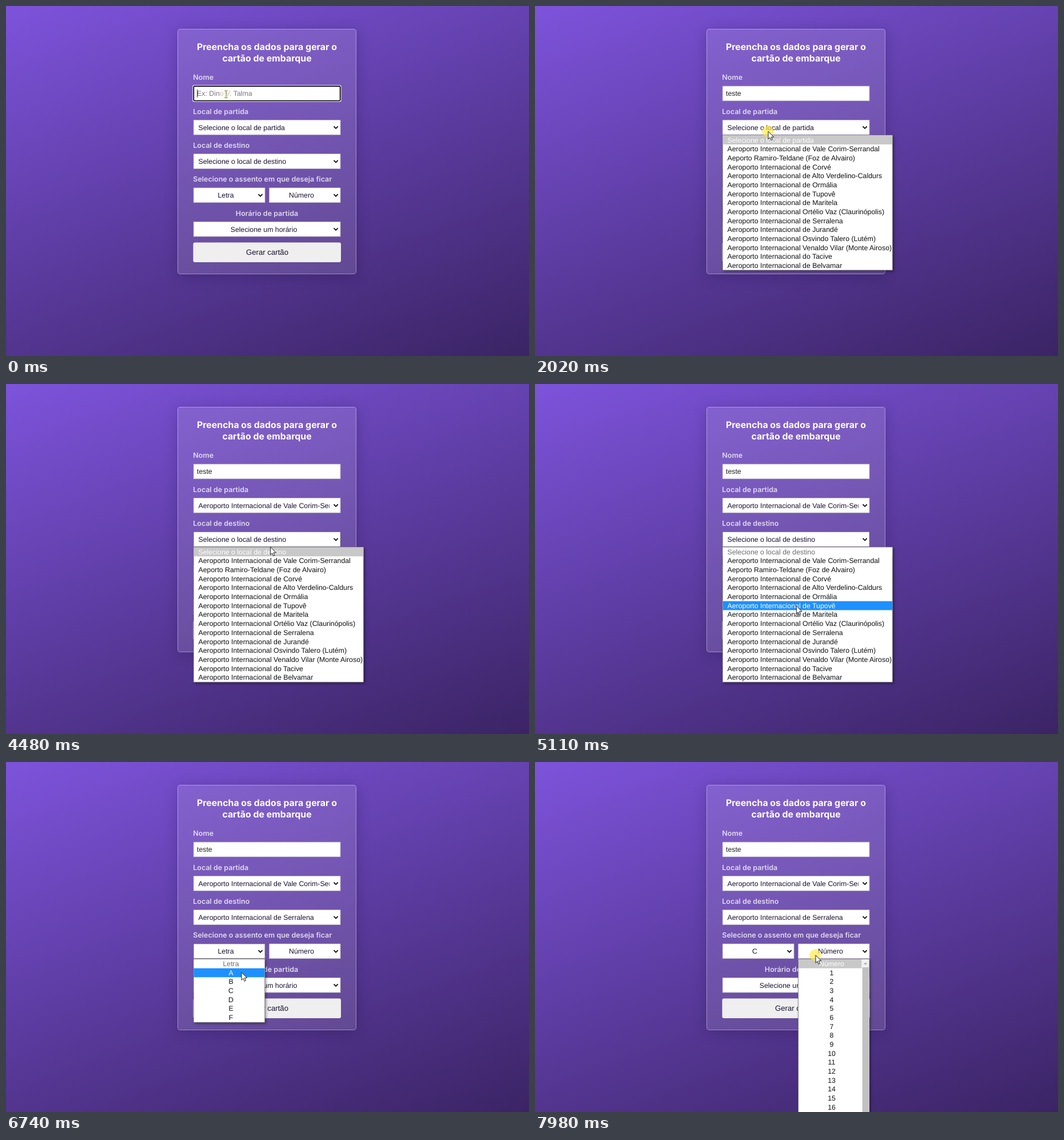
Write an HTML page that moves like this. It is 915x612 px and loops after 8 s.

```html
<!DOCTYPE html>
<html lang="pt-BR">
<head>
<meta charset="utf-8">
<title>Cartão de embarque</title>
<style>
html, body { margin: 0; width: 100%; height: 100%; overflow: hidden; }
body { position: relative; background: linear-gradient(160deg, #7d53db, #3b2465); }
.card {
  position: absolute; left: 300px; top: 40px; width: 313px; height: 429px;
  box-sizing: border-box; border: 1px solid rgba(255,255,255,.36); border-radius: 5px;
  background: rgba(255,255,255,.12); box-shadow: 0 4px 24px rgba(20,10,50,.22);
}
svg { position: absolute; left: 0; top: 0; width: 915px; height: 612px; overflow: hidden; }
text { font: 12.34px "Liberation Sans", Arial, sans-serif; text-rendering: geometricPrecision; white-space: pre; }
.title { font: 700 15.9px Inter, sans-serif; fill: #fff; }
.label { font: 600 12.5px Inter, sans-serif; fill: #e0d9ee; }
.button { font-size: 13.2px; }
.mid { text-anchor: middle; }
.menu { filter: drop-shadow(2px 2px 2px rgba(0,0,0,.4)); }
</style>
</head>
<body>
<div class="card"></div>
<svg viewBox="0 0 915 612">
  <defs><clipPath id="clip"><rect x="328" y="190" width="238" height="100"/></clipPath></defs>
  <g id="labels"></g>
  <g id="scene"></g>
</svg>
<script>
const LOOP = 8000, ROW = 15.67, PITCH = 59.3, INK = '#1a1230';
const $ = id => document.getElementById(id);
const ruler = document.createElement('canvas').getContext('2d');
ruler.font = '12.34px "Liberation Sans", Arial, sans-serif';

const inter = 'Aeroporto Internacional ';
const airports = [inter + 'de Vale Corim-Serrandal', 'Aeporto Ramiro-Teldane (Foz de Alvairo)',
  ...['de Corvé', 'de Alto Verdelino-Caldurs', 'de Ormália', 'de Tupovê', 'de Maritela',
    'Ortélio Vaz (Claurinópolis)', 'de Serralena', 'de Jurandé', 'Osvindo Talero (Lutém)',
    'Venaldo Vilar (Monte Airoso)', 'do Tacive', 'de Belvamar'].map(s => inter + s)];
const numbers = Array.from({ length: 20 }, (_, i) => i + 1);

const field = (line, more) => ({ x: 328, y: 139.9 + line * PITCH, w: 257, ...more });
const name = field(0);
const from = field(1, { hint: 'Selecione o local de partida', list: airports, pick: 1, open: 2020, close: 3590 });
const to = field(2, { hint: 'Selecione o local de destino', list: airports, pick: 9, open: 4210, close: 5510 });
const letter = field(3, { w: 125, mid: 384.5, hint: 'Letra', list: [...'ABCDEF'], pick: 3, open: 6600, close: 7490 });
const number = field(3, { x: 460.5, w: 124.5, mid: 517, hint: 'Número', list: numbers, open: 7980, close: LOOP });
const hour = field(4, { mid: 451, hint: 'Selecione um horário' });
const menus = [from, to, letter, number];

const menuTop = f => f.y + 27.2;
const onBox = f => f.y + 20;
const onRow = (f, i) => menuTop(f) + (i + .45) * ROW;

// Pointer moves: start, end, and where it arrives.
const moves = [
  [1740, 1950, 408, onBox(from)],
  [2090, 2660, 419, onRow(from, from.pick)],
  [3790, 4140, 463, onBox(to)],
  [4440, 5390, 455, onRow(to, to.pick)],
  [5510, 5710, 503, 437],
  [5840, 6400, 409, onBox(letter)],
  [6600, 6740, 412, onRow(letter, 1)],
  [6950, 7160, 408, onRow(letter, letter.pick)],
  [7490, 7910, 491, onBox(number)]
];

const text = (x, y, s, cls = '', fill = INK) =>
  `<text x="${x}" y="${y}" class="${cls}" ${fill && `fill="${fill}"`}>${s}</text>`;
const rect = (x, y, w, h, fill, more = '') =>
  `<rect x="${x}" y="${y}" width="${w}" height="${h}" fill="${fill}" ${more}/>`;
const within = (t, a, b) => t >= a && t < b;
const isOpen = (f, t) => within(t, f.open, f.close);

function pointerAt(t) {
  let x = 385, y = 154;
  for (const [start, end, nx, ny] of moves) {
    const k = Math.min(1, Math.max(0, (t - start) / (end - start)));
    x += (nx - x) * k;
    y += (ny - y) * k;
  }
  return [x, y];
}

// The field used last keeps the focus ring until another menu opens.
const focusAt = t => menus.reduce((held, f) => t >= f.close ? f : t >= f.open ? null : held, name);

const clickedAt = t => menus.some(f =>
  within(t, f.open - 70, f.open + 140) || within(t, f.close - 70, f.close));

function box({ x, y, w }, focused, active) {
  if (focused) return rect(x - .9, y - .9, w + 1.8, 27.8, '#fff', 'rx="2" stroke="#fff" stroke-width="1.4"') +
    rect(x + .3, y + .3, w - .6, 25.4, '#fff', 'rx="1.5" stroke="#101010" stroke-width="1.9"');
  return rect(x + .2, y + .2, w - .2, 25.7, '#fff', `stroke="${active ? '#777' : '#c4bdd0'}" stroke-width=".7"`);
}

function select(f, t, focused, clicked) {
  const base = f.y + 17.4;
  const value = t >= f.close ? f.list[f.pick - 1] : f.hint;
  const label = f.mid ? text(f.mid, base, value, 'mid')
    : `<g clip-path="url(#clip)">${text(336.5, base, value)}</g>`;
  return box(f, focused, isOpen(f, t) && !clicked) + label +
    `<path d="M${f.x + f.w - 11.5} ${f.y + 11.3}l3.6 3.6 3.6-3.6" fill="none" stroke="#111" stroke-width="1.8"/>`;
}

function menu(f, py) {
  const top = menuTop(f), wide = f.list === airports, bar = f === number;
  const w = wide ? 297.8 : f.w, inner = bar ? w - 13 : w;
  const rows = [f.hint, ...f.list];
  const hover = Math.max(0, Math.floor((py - top) / ROW));
  const x = wide ? 336.5 : f.x + (bar ? 58.5 : 65.5);
  let out = rect(f.x + .2, top - .5, w - .4, rows.length * ROW + 1, '#fff',
    'class="menu" stroke="#767676" stroke-width=".8"');
  // The disabled first row is grey only until the pointer reaches a live one.
  out += rect(f.x + .6, top, inner - 1.2, ROW, hover ? '#fff' : '#c8c8c8');
  if (hover) out += rect(f.x + .6, top + hover * ROW, inner - 1.2, ROW, '#1e90ff');
  rows.forEach((s, i) => {
    const fill = i === hover ? '#fff' : i ? '#111' : '#6d6d6d';
    out += text(x, top + i * ROW + 12.1, s, wide ? '' : 'mid', fill);
  });
  if (bar) out += rect(572, top, 12.5, 280, '#f1f1f1') + rect(572.8, top + 14, 11, 270, '#c1c1c1') +
    `<path d="M575.2 ${top + 8.8}h6l-3-3.2z" fill="#a3a3a3"/>`;
  return out;
}

const arrow = 'M0 0V13.6L3.1 10.8 5.2 15.6 7.4 14.6 5.4 9.9H9.8Z';
const hand = 'M-1.4 1.4C-1.4-.5 1.4-.5 1.4 1.4V6.2C2.2 5.6 3.9 5.9 4.1 7 5 6.4 6.5 6.8 6.7 7.9 ' +
  '7.6 7.4 9.2 7.9 9.2 9.4V13C9.2 15 8 16 7.8 18.6H0C-.2 16.4-2.4 14.6-3.6 12.3-4.9 10.2-3.2 9.2-1.4 11Z' +
  'M1.4 6.2V9.5M4.1 7V9.7M6.7 7.9V10';
const beam = 'M-2.7-6H-.6L0-5.5.6-6H2.7M0-5.5V6M-2.7 6.5H-.6L0 6 .6 6.5H2.7';

function pointer(t, x, y) {
  const shape = (d, style) => `<path transform="translate(${x} ${y})" d="${d}" ${style}/>`;
  if (t < 1070) return shape(beam, 'fill="none" stroke="#77703c"');
  if (t < 1740) return '';
  const onButton = within(y, 413.5, 448) && !menus.some(f => isOpen(f, t));
  return shape(onButton ? hand : arrow, 'fill="#fff" stroke="#111" stroke-width=".95" stroke-linejoin="round"');
}

function nameField(t, focused) {
  const s = 'teste'.slice(0, Math.max(0, Math.floor((t - 920) / 150)));
  const caret = focused && (t < 470 || s);
  return box(name, focused) +
    (s ? text(334, 157.4, s, '', '#222') : text(334, 157.4, 'Ex: Dino V. Talma', '', '#7a7488')) +
    (caret ? rect(334.3 + ruler.measureText(s).width, 146, .9, 14, '#111') : '');
}

function draw(t) {
  const [x, y] = pointerAt(t), focus = focusAt(t), clicked = clickedAt(t);
  let out = nameField(t, focus === name);
  for (const f of [...menus, hour]) out += select(f, t, focus === f, clicked);
  out += rect(327.5, 413.5, 258.5, 34.5, '#efefef', 'rx="3"') + text(457, 435, 'Gerar cartão', 'button mid');
  for (const f of menus) if (isOpen(f, t)) out += menu(f, y);
  if (t < 60) out += '<circle cx="383" cy="154" r="10" fill="#fffbe2" opacity=".6"/>';
  if (clicked) out += `<circle cx="${x - .7}" cy="${y}" r="10" fill="#ffe942" opacity=".68"/>`;
  $('scene').innerHTML = out + pointer(t, x, y);
}

$('labels').innerHTML =
  text(456.5, 77, 'Preencha os dados para gerar o', 'title mid', '') +
  text(456.5, 96.5, 'cartão de embarque', 'title mid', '') +
  ['Nome', 'Local de partida', 'Local de destino', 'Selecione o assento em que deseja ficar']
    .map((s, i) => text(327.3, 129.4 + i * PITCH, s, 'label', '')).join('') +
  text(456.5, 129.4 + 4 * PITCH, 'Horário de partida', 'label mid', '');

let start;
function tick(now) {
  start ??= now;
  draw((now - start) % LOOP);
  requestAnimationFrame(tick);
}
draw(0);
requestAnimationFrame(tick);
</script>
</body>
</html>
```
